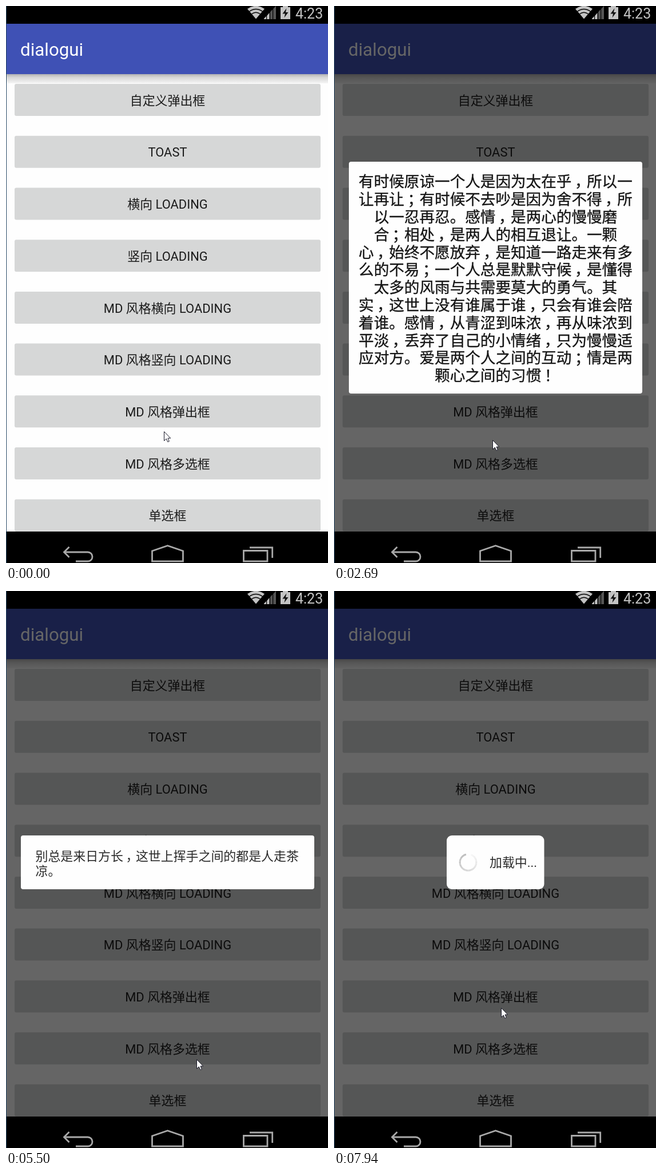
These frames come from a looping animation (563 px wide and 973 px high, 8000 ms). An HTML page:

```html
<!DOCTYPE html>
<html lang="zh-CN">
<head>
<meta charset="utf-8">
<title>dialogui</title>
<style>
html, body { margin: 0; width: 100%; height: 100%; overflow: hidden; background: #000; }
svg { display: block; position: absolute; left: 0; top: 0; }
text { font-family: Roboto, "Noto Sans CJK SC", "Noto Sans CJK", sans-serif; font-size: 21.93px; text-spacing-trim: space-all; white-space: pre; }
.button rect { fill: #d6d7d7; }
.button.down rect { fill: #b9bbba; }
.button text { fill: #1b1b1b; text-anchor: middle; }
.dialog { opacity: 0; }
.dialog > rect { fill: #fefefe; }
.dialog text { fill: #2a2a2a; }
#long text { font-size: 26.6px; fill: #161616; stroke: #161616; stroke-width: .35px; }
.nav { fill: none; stroke: #a9a9a9; stroke-width: 2.8; }
</style>
</head>
<body>
<svg width="563" height="973" viewBox="0 0 563 973">
  <defs>
    <linearGradient id="shade" x2="0" y2="1">
      <stop offset="0" stop-color="#b2b2b2"/>
      <stop offset=".35" stop-color="#d6d6d6"/>
      <stop offset="1" stop-color="#f5f5f5"/>
    </linearGradient>
  </defs>
  <rect width="563" height="973"/>

  <!-- status bar -->
  <g fill="#c4c4c4">
    <path d="M437 22.5L422 5Q437 -5.5 452 5Z"/>
    <path d="M425.5 9.5Q437 1.5 448.5 9.5M429.5 14Q437 8.5 444.5 14" fill="none" stroke="#000" stroke-width="1.5"/>
    <path d="M451 23V22L455 18V23ZM456.2 23V17L460.5 12V23Z"/>
    <path d="M462 23V10.5L466 6V23ZM467.2 23V5L472 0V23Z" fill="#555"/>
    <path d="M484 0H493V2H497V23H480V2H484Z"/>
    <path d="M490.5 4L483.5 13.5H488L486.5 20.5L493.5 11H489Z" fill="#111"/>
    <text x="506" y="21.5" style="font-size:25px">4:23</text>
  </g>

  <!-- page -->
  <rect x="1" y="31" width="562" height="887" fill="#fefefe"/>
  <rect x="1" y="119" width="562" height="16" fill="url(#shade)"/>
  <rect x="1" y="31" width="562" height="88" fill="#3f51b5"/>
  <text x="25" y="87" fill="#fff" style="font-size:31.3px">dialogui</text>
  <g id="list"></g>
  <rect id="dim" x="1" y="31" width="562" height="887" opacity="0"/>

  <!-- navigation bar -->
  <rect y="918" width="563" height="55"/>
  <g class="nav">
    <path d="M110.5 945L101.5 954L110.5 963M102 954H143A8 8 0 0 1 143 970H122"/>
    <path d="M255.5 970V952L282.5 942.7L309.5 952V970Z"/>
    <path d="M415.5 951.5H457V970H415.5ZM426 946H465.7V964"/>
  </g>
  <rect width="1" height="973" fill="#2b4c68"/>

  <g class="dialog" id="long">
    <rect x="26" y="272" width="513" height="405" rx="4"/>
  </g>
  <g class="dialog" id="toast">
    <rect x="26" y="427" width="513" height="94" rx="4"/>
  </g>
  <g class="dialog" id="loading">
    <rect x="197" y="427" width="170.5" height="94" rx="9"/>
    <g id="spin" fill="none" stroke-width="3"></g>
    <text x="272" y="482">加载中...</text>
  </g>

  <path id="cursor" d="M.5 .5V16.5L4.3 13L6.8 18.5L9.3 17.4L7 12H11.7Z" fill="#fff" stroke="#1a1a2a"/>
</svg>
<script>
const LOOP = 8000, TICK = 137;
const $ = id => document.getElementById(id);

const labels = ['自定义弹出框', 'TOAST', '横向 LOADING', '竖向 LOADING', 'MD 风格横向 LOADING',
  'MD 风格竖向 LOADING', 'MD 风格弹出框', 'MD 风格多选框', '单选框'];
$('list').innerHTML = labels.map((label, i) => {
  const y = 136 + i * 90.72;
  return `<g class="button"><rect x="15" y="${y}" width="535" height="56" rx="3"/>` +
    `<text x="282.5" y="${y + 36.7}">${label}</text></g>`;
}).join('');

// Commas, semicolons and exclamation marks sit in the middle of their cell.
const line = (s, x, y, shift) => `<text x="${x}" y="${y}">` +
  s.replace(/([，；！])(.?)/g, `<tspan dx="${shift}">$1</tspan><tspan dx="${-shift}">$2</tspan>`) + '</text>';

const verse = `有时候原谅一个人是因为太在乎，所以一
让再让；有时候不去吵是因为舍不得，所
以一忍再忍。感情，是两心的慢慢磨
合；相处，是两人的相互退让。一颗
心，始终不愿放弃，是知道一路走来有多
么的不易；一个人总是默默守候，是懂得
太多的风雨与共需要莫大的勇气。其
实，这世上没有谁属于谁，只会有谁会陪
着谁。感情，从青涩到味浓，再从味浓到
平淡，丢弃了自己的小情绪，只为慢慢适
应对方。爱是两个人之间的互动；情是两
颗心之间的习惯！`.split('\n');
$('long').innerHTML += verse.map((s, i) =>
  line(s, 282.5 - s.length * 13.3, 316.3 + i * 30.8, 5.5)).join('');
$('toast').innerHTML += line('别总是来日方长，这世上挥手之间的都是人走茶', 51.5, 471.2, 4.5) +
  line('凉。', 51.5, 497, 0);

// Ring that darkens clockwise, with a gap at its end.
let ring = '';
for (let a = 0; a < 325; a += 5) {
  const g = Math.round(246 - a * .2);
  ring += `<circle r="14.3" pathLength="360" stroke="rgb(${g},${g},${g})"
    stroke-dasharray="5.6 354.4" transform="rotate(${a})"/>`;
}
$('spin').innerHTML = ring;

// The pointer glides from stop to stop.
const home = { x: 276, y: 743 };
const moves = [
  { from: 500, to: 1070, x: 245, y: 168 },
  { from: 1740, to: 1860, x: 279, y: 258 },
  { from: 1990, to: 2570, x: 277, y: 728 },
  { from: 2690, to: 2690, x: 277, y: 758 },
  { from: 3226, to: 3770, x: 245, y: 266 },
  { from: 4870, to: 5500, x: 333, y: 818 },
  { from: 5910, to: 5910, x: 269, y: 538 },
  { from: 6050, to: 6470, x: 239, y: 364 },
  { from: 7268, to: 7940, x: 292, y: 728 }
];

// Dialogs in the order of the buttons that open them.
const dialogs = [
  { id: 'long', press: 1620, open: 1860, close: 3090 },
  { id: 'toast', press: 4170, open: 4320, close: 5750 },
  { id: 'loading', press: 7000, open: 7134, close: LOOP }
];
const buttons = document.querySelectorAll('.button');

// Share of a move done at t, in even screen refreshes.
function progress(t, { from, to }) {
  if (t >= to) return 1;
  const n = Math.round((to - from) / TICK);
  const p = (Math.floor((t - from) / (to - from) * n) + 1) / (n + 1);
  return p * p * (3 - 2 * p);
}

function pointer(t) {
  let { x, y } = home;
  for (const m of moves) {
    if (t < m.from) break;
    const p = progress(t, m);
    x += (m.x - x) * p;
    y += (m.y - y) * p;
  }
  return [Math.round(x), Math.round(y)];
}

// Each fade shows one halfway refresh.
function shown(t, { open, close }) {
  if (t < open || t >= close + TICK) return 0;
  return t < open + 130 || t >= close ? .45 : 1;
}

function draw(now) {
  const t = now % LOOP;
  let dim = 0;
  dialogs.forEach((d, i) => {
    const p = shown(t, d);
    $(d.id).style.opacity = 1 - (1 - p) ** 2;
    buttons[i].classList.toggle('down', t >= d.press && t < d.open);
    dim = Math.max(dim, p * .6);
  });
  $('dim').setAttribute('opacity', dim);
  $('cursor').setAttribute('transform', `translate(${pointer(t)})`);
  const turn = Math.floor(t / TICK) * 40 - 70;
  $('spin').setAttribute('transform', `translate(234.5 474) rotate(${turn - 2280 + 2160 - 40 * 0})`);
}

let start;
function loop(now) {
  start ??= now;
  draw(now - start);
  requestAnimationFrame(loop);
}
draw(0);
requestAnimationFrame(loop);
</script>
</body>
</html>
```
